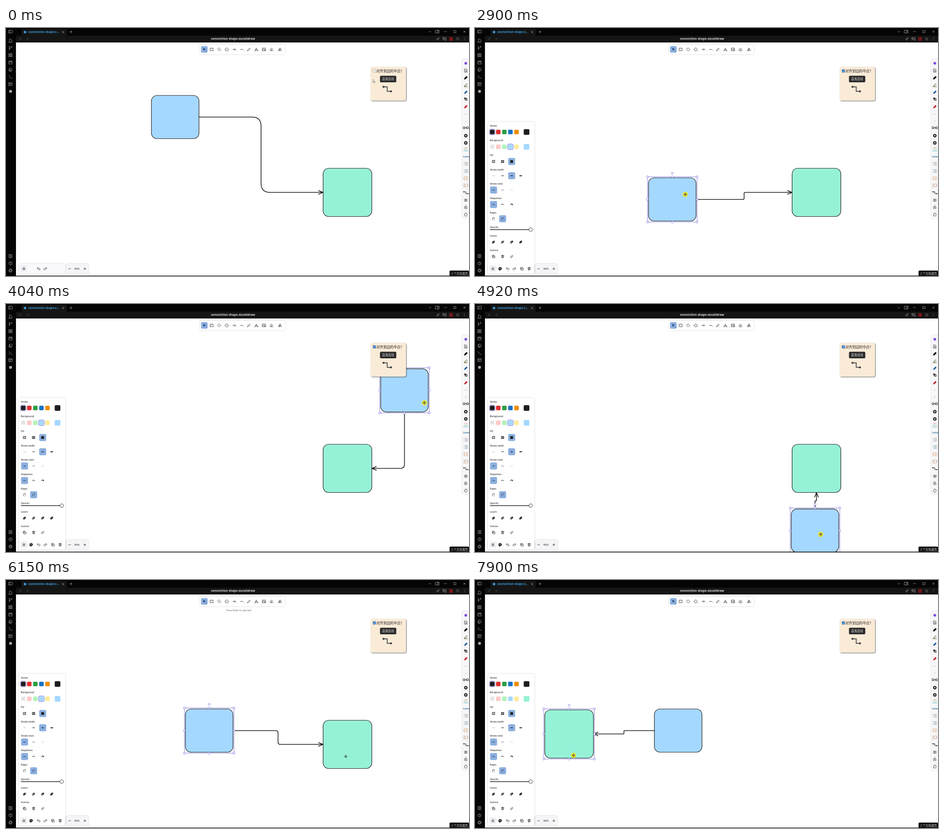
Write an HTML page that moves like this. It is 1022 px wide and 548 px high and loops after 8000 ms.

```html
<!DOCTYPE html>
<html lang="zh">
<head>
<meta charset="utf-8">
<style>
html, body { margin: 0; width: 100%; height: 100%; overflow: hidden; background: #000; }
svg { display: block; width: 1022px; height: 548px; }
text { font: 5.6px Lato, "Noto Sans", sans-serif; fill: #1b1b1f; }
text.bold { font: bold 6.75px "Noto Sans", sans-serif; fill: #dcdcdc; }
text.cjk { font-family: "Noto Sans CJK SC", "Noto Sans CJK", sans-serif; }
.card { filter: drop-shadow(0 .5px 1.5px #0003); }
</style>
</head>
<body>
<svg id="stage" viewBox="0 0 1022 548"></svg>
<script>
const INK = '#1e1e1e', ACCENT = '#8bafe0', PURPLE = '#6965db', BLUE = '#a5d8ff', GREEN = '#96f2d7';

// Drawing helpers; icons are drawn around their own centre.
const rect = (x, y, w, h, fill, r = 0, extra = '') =>
  `<rect x="${x}" y="${y}" width="${w}" height="${h}" rx="${r}" fill="${fill}" ${extra}/>`;
const dot = (x, y, r, fill, extra = '') => `<circle cx="${x}" cy="${y}" r="${r}" fill="${fill}" ${extra}/>`;
const text = (x, y, s, extra = '') => `<text x="${x}" y="${y}" ${extra}>${s}</text>`;
const icon = (x, y, d, color = INK, width = .8, fill = 'none') =>
  `<path transform="translate(${x} ${y})" d="${d}" stroke="${color}" stroke-width="${width}" fill="${fill}" stroke-linecap="round" stroke-linejoin="round"/>`;
const gear = (x, y, color, width = 2) =>
  dot(x, y, 2.4, 'none', `stroke="${color}" stroke-width="${width}"`) +
  dot(x, y, 3.6, 'none', `stroke="${color}" stroke-width="1.2" stroke-dasharray="1.4 1.43"`);

const P = {
  close: 'M-2-2L2 2M2-2L-2 2',
  plus: 'M-2.5 0H2.5M0-2.5V2.5',
  box: 'M-3-2.7H3V2.7H-3Z',
  menu: 'M-2.5-2H2.5M-2.5 0H2.5M-2.5 2H2.5',
  undo: 'M-1-3L-3-1L-1 1M-3-1H1.5A1.8 1.8 0 0 1 1.5 2.6H0',
  redo: 'M1-3L3-1L1 1M3-1H-1.5A1.8 1.8 0 0 0-1.5 2.6H0',
  copy: 'M-1-1H3V3H-1ZM-1 1H-3V-3H1V-1',
  trash: 'M-3-2H3M-2.2-2L-1.8 3H1.8L2.2-2M-1-2V-3.2H1V-2M-.7 0V1.5M.7 0V1.5',
  link: 'M-.8 .8L.8-.8M-.6-1.4L.6-2.6A1.5 1.5 0 0 1 2.6-.6L1.4 .6M.6 1.4L-.6 2.6A1.5 1.5 0 0 1-2.6 .6L-1.4-.6',
  pen: 'M-3 3L-2.3 .8L1.5-3L3-1.5L-.8 2.3Z',
  book: 'M0-2.2H-3V2.2H0M0-2.2H3V2.2H0ZM0-2.2V2.2',
  file: 'M-2.6-3.6H1L2.6-2V3.6H-2.6ZM-1.2 .6H1.2M0-.6V1.8',
  list: 'M-1.6-3H4M-1.6 0H4M-1.6 3H4M-4-3H-3.6M-4 0H-3.6M-4 3H-3.6',
  elbow: 'M-4-2H0V2H4',
  hand: 'M-2 3.2L-3.2 .6L-2 .4V-2.4H-.8V-3.2H.4V-2.5H1.6V-1.8H2.8V1.2L1.8 3.2Z',
  wave: 'M-2.6 1C-1-3 0-1 .3 0S2 1 2.6-.6',
  cross: 'M-3 0H3M0-3V3M-1-2L0-3.2L1-2M-1 2L0 3.2L1 2M-2-1L-3.2 0L-2 1M2-1L3.2 0L2 1'
};

function windowFrame() {
  const grey = '#a8a8a8', dim = '#4a4a4a';
  const ribbon = [
    [8, 'M-4-3H4V3H-4ZM-1.5-3V3'],
    [28, 'M-2.5 0V-3.5H1L3-1.5V3.5H0M-2 1.2A1.4 1.4 0 1 0-1.9 1.2M-3.2 3.4L-4 4'],
    [44, 'M-2.5-3V3M2.5-3V-1L-2.5 1M-3.5-3H-1.5M1.5-3H3.5M-3.5 3H-1.5'],
    [60, 'M-3.5-3.5H-.8V-.8H-3.5ZM.8-3.5H3.5V-.8H.8ZM-3.5 .8H-.8V3.5H-3.5ZM.8 .8H3.5V3.5H.8Z'],
    [76, 'M-3.5-2.6H3.5V3.5H-3.5ZM-3.5-.6H3.5M-1.6-3.8V-2M1.6-3.8V-2'],
    [92, 'M-1.2-3.5H2L3.3-2.2V2H-1.2ZM-1.2-1.5H-3.2V3.6H1.2V2'],
    [108, 'M-3.5-3L-.5-.4L-3.5 2.2M.5 3H3.8'],
    [124, 'M-3.5-3.3H3.5V3.3H-3.5ZM-3.5-1H3.5M-1-1V3.3'],
    [504, 'M-3-3.5H3V3.5H-3ZM-1-1.4H1M-1 0H1M-1 1.4H1'],
    [520, 'M-3.6 0A3.6 3.6 0 1 1-3.6 .1M-1-1C-1-2.4 1.2-2.2 1-.8C.8 0 0 0 0 .9M0 2V2.1']
  ];
  return rect(0, 0, 1022, 18, '#050505') + rect(0, 0, 22, 548, '#050505') +
    rect(22, 17, 1000, 15, '#151515') + rect(34, 2, 100, 17, '#151515', 3) +
    rect(22, 547, 1000, 1, '#111') +
    ribbon.map(([y, d]) => icon(10, y, d, grey)).join('') + dot(10, 140, 3.2, grey) + gear(10, 536, grey, 1) +
    dot(42, 9, 2.8, '#3d9ad8') +
    text(49, 11.4, 'connection shape.e...', 'class="bold" style="font-size:6.5px;fill:#3d9ad8"') +
    icon(126, 9, P.close, grey) + icon(143.5, 8.5, P.plus, grey) +
    icon(936, 8, 'M-2.3-1L0 1.3L2.3-1', grey) + icon(952, 8, 'M-4-3H4V3H-4ZM1-3V3M2-1.5H3', grey) +
    icon(970, 8, 'M-2.5 0H2.5', grey) + icon(991, 8, 'M-2.3-2.3H2.3V2.3H-2.3Z', grey) + icon(1012, 8, P.close, grey) +
    icon(32, 24, 'M2.5 0H-2.5M-.5-2L-2.5 0L-.5 2', dim) + icon(47, 24, 'M-2.5 0H2.5M.5-2L2.5 0L.5 2', dim) +
    text(501, 26.2, 'connection shape.excalidraw', 'class="bold" text-anchor="middle"') +
    icon(953.5, 24, P.link, grey) + icon(968, 24, 'M-3.5-3H-.8V0H-3.5ZM.8-3H3.5V3H.8V0M-3.5 3L-.8 0', grey) +
    icon(982.5, 24, 'M-3-3H2L3-2V3H-3ZM-1.5-3V-1H1.5V-3M-1.5 3V1H1.5V3', '#c5161d', 1) +
    dot(997, 24, 3, '#333', `stroke="${dim}" stroke-width=".8"`) +
    [-2.5, 0, 2.5].map(d => dot(1012, 24 + d, .6, grey)).join('') +
    rect(979, 536, 43, 12, '#111', 2) +
    text(983, 545, '2 个文档属性', 'class="cjk" style="font-size:6.4px;fill:#c8c8c8"');
}

function toolbar() {
  const tools = [
    [454, 'M-3-2.8H3V2.8H-3Z'], [470.5, 'M0-3.4L3.4 0L0 3.4L-3.4 0Z'], [487, 'M-3.4 0A3.4 3.4 0 1 1-3.4 .1'],
    [503.5, 'M-3 0H3M1-2L3 0L1 2'], [520, 'M-3 0H3'], [536, P.pen], [552.5, 'M-2.8 3L0-3L2.8 3M-1.8 1H1.8M-3.5 3H-2M2 3H3.5'],
    [569.5, 'M-3.3-3H3.3V3H-3.3ZM-3.3 1L-1-1L1.5 2M.5 0L1.5-.6L3.3 1.4'], [585.5, 'M-3.2 1L1-3L3.2-.8L-.6 3H-1.4ZM-1-1L1.2 1.2M0 3H3']
  ];
  return `<g class="card">${rect(428, 37, 188, 21, '#fff', 4)}</g>` + rect(430.5, 40, 14.5, 14.5, ACCENT, 3) +
    icon(438, 47.3, 'M-2-2.4L2.2-.6L.4 .3L-.5 2.3Z', '#102a55', .8, '#2c4f8a') +
    text(441.5, 53, '1', 'style="font-size:3px"') +
    tools.map(([x, d], i) => icon(x, 47.3, d) + text(x + 3.7, 51.3, (i + 2) % 10, 'style="font-size:3px;fill:#888"')).join('') +
    icon(605, 47.3, 'M0-3.2L1.6-.4H-1.6ZM-3 .8H-.8V3H-3ZM3 1.9A1.1 1.1 0 1 1 3 1.8');
}

function sideTools() {
  const x = 1015, items = [
    [94, P.file], [110, P.pen, '#111', 1.6, '#111'], [126, P.pen + 'M-4 3.8H4', '#5b5b1c', 1], [142, P.pen, '#1f5f9c', 1.2, '#1f5f9c'],
    [157, 'M-3-3L2-1.5L3 2L2 3L-1.5 2ZM-3-3L.5 .5', '#111', 1.1], [174, P.pen, '#c3202a', 1.2, '#c3202a'],
    [190, P.wave, '#c4c4c4'], [206, 'M2-2.5C-4-2.5 4 2-2 2.5', '#c4c4c4'], [220.5, 'M-5.5-2H-2V2H-5.5ZM2-2H5.5V2H2ZM-2 0H2', '#222', 1],
    [300, P.list, '#777'], [316, P.list, '#4d7087'], [332, 'M-2-4Q-3.5-4-3.5-2T-5 0Q-3.5 0-3.5 2T-2 4M0-3H4M0 0H4M0 3H4', '#d1762f'],
    [348, 'M2-4Q3.5-4 3.5-2T5 0Q3.5 0 3.5 2T2 4M-5-3H0M-5 0H0M-5 3H0', '#b27752'], [364, P.elbow, '#222', 1.1],
    [380.5, P.book, '#333'], [396, 'M-2.5-.5H2.5V3H-2.5ZM-1.5-.5V-2A1.5 1.5 0 0 1 1.5-2.4M0 1V1.5', '#333'], [412, P.hand, '#333']
  ];
  return `<g class="card">${rect(1007, 69, 20, 351, '#f7f7f9', 3)}</g>` + dot(x, 78, 3, '#7a4ee0') +
    items.map(([y, ...rest]) => icon(x, y, ...rest)).join('') + gear(x, 238, '#222') + gear(x, 254, '#222') +
    icon(x, 264.5, 'M-3 0H3', '#e06a6a') + icon(x, 268, 'M-4 0H4', '#55b96b') + icon(x, 271.5, 'M-5 0H5', '#38a7c9') +
    text(1009, 286.3, 'Latex', 'style="font-size:5.5px;font-weight:bold;fill:#2b6f97"') +
    dot(1010.5, 362, 1.2, '#222') + dot(1019.5, 366, 1.2, '#222');
}

const bottomBar = () =>
  `<g class="card">${rect(28.5, 521, 102.5, 22, '#f9f9fb', 4)}${rect(133, 521, 49, 22, '#f5f5f8', 4)}</g>` +
  rect(32, 524, 15, 15, '#f0f0f5', 3) + icon(39.5, 532, P.menu) + icon(72, 532, P.undo) + icon(87, 532, P.redo) +
  icon(140.5, 532, 'M-2.5 0H2.5') + text(157, 534, '80%', 'text-anchor="middle" style="font-size:6.1px"') + icon(174, 532, P.plus);

function panel() {
  const labels = { Stroke: 217.5, Background: 250.2, Fill: 282.8, 'Stroke width': 314.8, 'Stroke style': 346.3,
    Sloppiness: 378.3, Edges: 410.3, Opacity: 441.8, Layers: 461.3, Actions: 493 };
  const swatches = (y, colors) => colors.map((c, i) => rect(33 + i * 13.4, y - 5, 10, 10, c, 2)).join('');
  const ring = (x, y, id) => rect(x - 6.2, y - 6.2, 12.4, 12.4, 'none', 3, `id="${id}" stroke="${PURPLE}"`);
  const chosen = [[81, 295], [81, 326.5], [41, 358], [41, 390], [61, 421.5]];
  const corner = 'M-2 2.5V-2H2.5', square = 'M-2.6-2.6H2.6V2.6H-2.6Z';
  const tools = [
    [41, 295, square + 'M-2.6 0L0-2.6M-2.6 2.6L2.6-2.6M0 2.6L2.6 0'],
    [61, 295, square + 'M-2.6 0L0-2.6M-2.6 2.6L2.6-2.6M0 2.6L2.6 0M-2.6 0L0 2.6M-2.6-2.6L2.6 2.6M0-2.6L2.6 0'],
    [81, 295, square, INK, .8, INK],
    [41, 326.5, 'M-2.4 0H2.4', '#888', .6], [61, 326.5, 'M-2.4 0H2.4', INK, 1], [81, 326.5, 'M-2 0H2', INK, 1.5], [101, 326.5, 'M-2 0H2', INK, 2.1],
    [41, 358, 'M-2.4 0H2.4', INK, 1], [61, 358, 'M-2.4 0H-1.6M-.4 0H.4M1.6 0H2.4'], [81, 358, 'M-2.5 0H-2.5M-1 0H-1M.5 0H.5M2 0H2', '#777', .7],
    [41, 390, 'M-3 1C-1.5-2 0-1.5 0 0S2 1 3 0'], [61, 390, P.wave, INK, 1], [81, 390, 'M-3 1C-1-3 1-2 .5 0S1 1.5 3-1M-2 0C0-3 2-1 2 1', INK, .9],
    [41, 421.5, corner + 'M2.5 0V.1M2.5 2.5V2.6M0 2.5V2.6'], [61, 421.5, 'M-2 2.5V0Q-2-2 0-2H2.5M2.5 0V.1M2.5 2.5V2.6M0 2.5V2.6'],
    [41, 505, P.copy], [61, 505, P.trash], [81, 505, P.link],
    [103.5, 532, P.copy], [119.5, 532, P.trash]
  ];
  [41, 61, 81, 101].forEach((x, i) => tools.push(
    [x, 473, 'M0-2.6H2.6V0H0Z', INK, .7, i > 1 ? INK : 'none'],
    [x, 473, 'M-2.6 0H0V2.6H-2.6ZM-1.5-1.5H1.5V1.5H-1.5Z', INK, .7, i % 3 ? 'none' : '#555']));
  return `<g class="card">${rect(28.5, 207, 102.5, 336, '#fff', 4)}</g>` +
    Object.entries(labels).map(([s, y]) => text(32.7, y, s)).join('') +
    swatches(229.7, [INK, '#e03131', '#2f9e44', '#1971c2', '#f08c00']) + ring(38, 229.7, 'strokeRing') +
    swatches(262.5, ['#f1f1f1', '#ffc9c9', '#b2f2bb', BLUE, '#ffec99']) + ring(78.2, 262.5, 'fillRing') +
    icon(38, 262.5, 'M-3-3H-1M1-3H3M-1-1H1M-3 1H-1M1 1H3', '#d5d5d5', 1.5) +
    rect(107.5, 223.5, 12.5, 12.5, INK, 2.5) + rect(107.5, 256.3, 12.5, 12.5, BLUE, 2.5, 'id="current"') +
    chosen.map(([x, y]) => rect(x - 7.7, y - 7.7, 15.4, 15.4, ACCENT, 3)).join('') +
    tools.map(a => icon(...a)).join('') +
    icon(0, 445.5, 'M33.5 0H123', INK, 1.4) + dot(123, 445.5, 4, '#fff', `stroke="${INK}" stroke-width=".8"`) +
    rect(32, 524, 15, 15, '#f0f0f5', 3) + icon(39.5, 532, P.menu) + icon(72, 532, P.undo) + icon(87, 532, P.redo) +
    icon(55.5, 532, 'M3.5 0A3.5 3.5 0 1 0 0 3.5C1.5 3.5-.5 1.2 1 1.2H2.5A1 1 0 0 0 3.5 0Z', INK, .8, INK) +
    [[-1.8, -.2], [-.5, -1.9], [1.6, -1.3]].map(([x, y]) => dot(55.5 + x, 532 + y, .7, '#fff')).join('');
}

const note = () =>
  rect(805, 86, 78, 74.5, '#faebd7', 4, 'style="filter:drop-shadow(1px 1px 1px #0009)"') +
  rect(810, 91.7, 6.3, 6.3, '#fff', 1, 'id="check" stroke="#777" stroke-width=".6"') +
  `<g id="tick">${icon(813.1, 94.9, 'M-1.9 0L-.6 1.5L2-1.5', '#fff', 1)}</g>` +
  text(817.5, 98, '对齐到边的中点?', 'class="cjk" style="font-size:7.6px"') +
  rect(825.5, 105.5, 36, 14.5, '#2b2b2b', 2.5) +
  text(843.5, 115.2, '直角连线', 'class="cjk" text-anchor="middle" style="font-size:6.6px;fill:#ddd"') +
  icon(841.5, 135, 'M-8-5H0V5H8', '#555', 2) + dot(833.3, 130, 2.3, '#444') + dot(849.7, 140, 2.3, '#444');

const shape = (id, w, h, fill) => rect(0, 0, w, h, fill, 12.5, `id="${id}" stroke="${INK}" stroke-width="1.2"`);

document.getElementById('stage').innerHTML =
  `<clipPath id="view">${rect(22, 32, 1000, 515, '#fff')}</clipPath>` + rect(22, 32, 1000, 515, '#fff') +
  `<g clip-path="url(#view)">${shape('blue', 105, 95.5, BLUE)}${shape('green', 107.5, 106.5, GREEN)}` +
  `${`<path id="arrow" fill="none" stroke="${INK}" stroke-width="1.6" stroke-linecap="round" stroke-linejoin="round"/>`}<g id="selection"></g></g>` +
  windowFrame() + toolbar() + text(514, 69.2, 'Press Enter to add text', 'id="hint" text-anchor="middle" style="fill:#666"') +
  sideTools() + bottomBar() + `<g id="panel">${panel()}</g>` + note() +
  `<g id="pointer">${icon(0, 0, 'M0 0V6.6L1.6 5.2L2.7 7.4L3.7 6.9L2.7 4.8H4.7Z', '#333', .6, '#fff')}</g>` +
  `<g id="mover">${dot(0, 0, 6, '#ece62e', 'id="press" opacity=".9"')}${icon(0, 0, P.cross, '#333', .8)}</g>`;

// Motion: [time, x, y]
const BLUE_PATH = [[1990, 321, 149], [2300, 303, 215], [2550, 315, 300], [2800, 386, 347], [2900, 383, 331], [2990, 384, 330],
  [3300, 520, 220], [3660, 708, 113], [3740, 738, 111], [4033, 827, 143], [4130, 844, 181], [4350, 896, 330], [4520, 892, 418],
  [4630, 860, 425], [4800, 760, 436], [4907, 698, 453], [5002, 683, 471], [5200, 600, 478], [5400, 531, 435], [5600, 440, 340], [5780, 396, 285]];
const GREEN_PATH = [[6340, 700, 310], [6600, 640, 250], [6850, 550, 130], [7130, 430, 59], [7350, 330, 38], [7600, 220, 120], [7890, 154, 287]];
const HOVER_PATH = [[0, 810, 114], [100, 810, 111], [170, 810, 107], [340, 810.5, 105], [640, 814, 97], [930, 814.5, 97.5], [1020, 815, 97.5],
  [1115, 815, 97.5], [1667, 411, 202], [1940, 401, 187], [5780, 476, 323], [6149, 750, 390], [6245, 763, 405], [6340, 763.5, 410.5]];
const PRESS = 1940, RELEASE = 5780, PRESS2 = 6330, LAG = 95;

// The picture advances in steps rather than continuously.
const ticks = [0, 100, 170, 340, 440, 540, 640, 930, 1020];
[1210, 2050, 2900, 3750, 4630, 5490, 6350, 7230, 8091].forEach((start, i, all) => {
  for (let k = 0; k < 9 && i < 8; k++) ticks.push(start + k * (all[i + 1] - start) / 9 - (k ? 10 : 0));
});
const snap = t => ticks.filter(s => s <= t && s < 7950).pop();

// Monotone cubic interpolation along a timed path.
function at(path, t) {
  const last = path.length - 1;
  if (t <= path[0][0]) return path[0].slice(1);
  if (t >= path[last][0]) return path[last].slice(1);
  const i = path.findIndex(p => p[0] > t) - 1;
  const span = path[i + 1][0] - path[i][0], u = (t - path[i][0]) / span;
  return [1, 2].map(c => {
    const slope = k => (path[k + 1][c] - path[k][c]) / (path[k + 1][0] - path[k][0]);
    const tangent = k => {
      if (k < 1 || k >= last) return 0;
      const a = slope(k - 1), b = slope(k);
      return a * b > 0 ? 2 * a * b / (a + b) : 0;
    };
    const p = path[i][c], q = path[i + 1][c], v = u * u * (3 - 2 * u);
    return p + (q - p) * v + span * u * (1 - u) * ((1 - u) * tangent(i) - u * tangent(i + 1));
  });
}

function elbow(b, g) {
  const bx = b[0] + 52.5, by = b[1] + 47.75, gx = g[0] + 53.75, gy = g[1] + 53.25;
  const dx = gx - bx, dy = gy - by, sx = Math.sign(dx), sy = Math.sign(dy);
  const below = by + sy * 47.75, side = gx - sx * 53.75;
  if (Math.abs(dx) < 106) {
    const end = gy - sy * 53.25, mid = (below + end) / 2;
    return [[bx, below], [bx, mid], [gx, mid], [gx, end]];
  }
  if (Math.abs(dy) > Math.abs(dx)) return [[bx, below], [bx, gy], [side, gy]];
  const start = bx + sx * 52.5, mid = (start + side) / 2;
  return [[start, by], [mid, by], [mid, gy], [side, gy]];
}

function arrowPath(pts, radius, share) {
  const dist = (p, q) => Math.hypot(q[0] - p[0], q[1] - p[1]);
  const toward = (p, q, r) => p.map((v, c) => v + (q[c] - v) * r / (dist(p, q) || 1));
  let d = 'M' + pts[0];
  for (let i = 1; i < pts.length - 1; i++) {
    const [p, q, n] = pts.slice(i - 1, i + 2), r = Math.min(radius, dist(p, q) / share, dist(q, n) / share);
    d += `L${toward(q, p, r)}Q${q} ${toward(q, n, r)}`;
  }
  const [prev, tip] = pts.slice(-2), [x, y] = toward(tip, prev, 10);
  const ox = (y - tip[1]) * .4, oy = (x - tip[0]) * .4;
  return `${d}L${tip}M${x + ox} ${y - oy}L${tip}L${x - ox} ${y + oy}`;
}

function handles([x, y], w, h) {
  const line = `stroke="${PURPLE}" stroke-width=".8"`;
  const xs = [x - 2.2, x + w / 2, x + w + 2.2], ys = [y - 2.2, y + h / 2, y + h + 2.2];
  let s = rect(xs[0], ys[0], w + 4.4, h + 4.4, 'none', 0, line) + dot(xs[1], y - 10.3, 2.1, '#fff', line);
  xs.forEach((hx, i) => ys.forEach((hy, j) => { if (i != 1 || j != 1) s += rect(hx - 2, hy - 2, 4, 4, '#fff', 1, line); }));
  return s;
}

const el = id => document.getElementById(id);
const show = (id, on) => el(id).setAttribute('display', on ? 'inline' : 'none');
const move = (id, [x, y]) => el(id).setAttribute('transform', `translate(${x} ${y})`);

function draw(t) {
  const b = at(BLUE_PATH, t), g = at(GREEN_PATH, t);
  const selected = t >= PRESS, second = t >= PRESS2, first = selected && t < RELEASE;
  let cursor = at(HOVER_PATH, t);
  if (first) cursor = at(BLUE_PATH, t + LAG).map((v, c) => v + [80, 38][c]);
  if (second) cursor = at(GREEN_PATH, t + LAG).map((v, c) => v + [63.5, 100.5][c]);
  const moving = selected && (first || second || cursor[0] < 503 || cursor[0] > 700);

  move('blue', b);
  move('green', g);
  el('arrow').setAttribute('d', arrowPath(elbow(b, g), ...(t < 2000 ? [20, 2] : [9, 6])));
  el('selection').innerHTML = !selected ? '' : second ? handles(g, 107.5, 106.5) : handles(b, 105, 95.5);
  show('panel', selected);
  show('fillRing', !second);
  el('current').setAttribute('fill', second ? GREEN : BLUE);
  show('hint', t >= RELEASE && !second);
  show('tick', t >= 640);
  el('check').setAttribute('fill', t >= 640 ? '#1976d2' : '#faf4ec');
  show('pointer', !moving);
  show('mover', moving);
  show('press', first || second);
  move('pointer', cursor);
  move('mover', cursor);
}

function frame(now) {
  draw(snap(now % 8000));
  requestAnimationFrame(frame);
}
requestAnimationFrame(frame);
</script>
</body>
</html>
```
